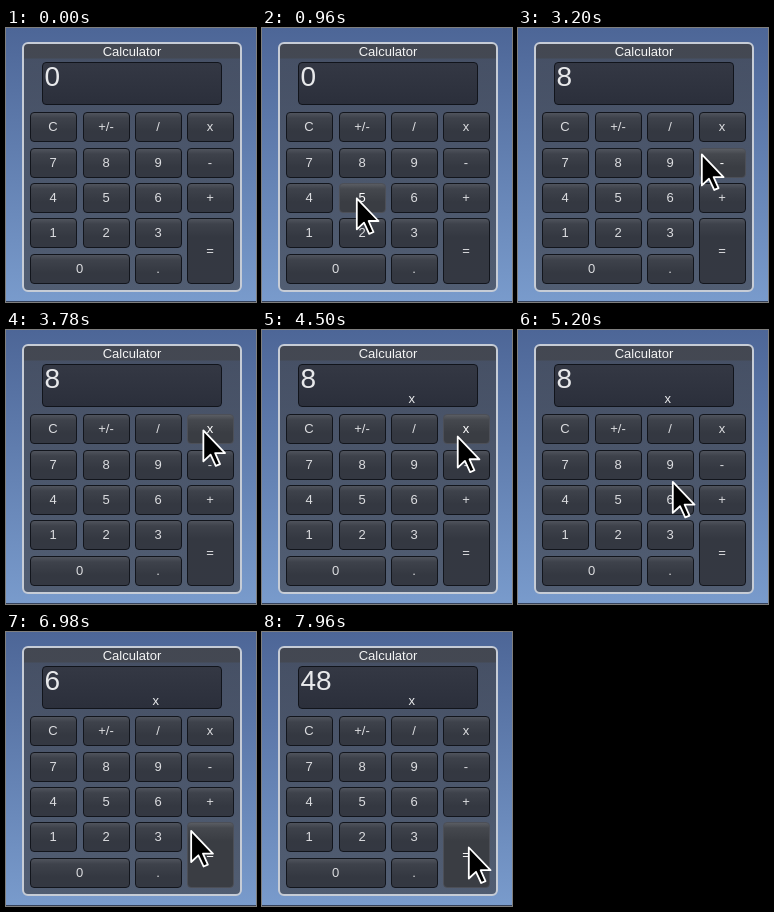
An HTML page for the animation above (8 s loop, 250 by 274 pixels).

```html
<!DOCTYPE html>
<html lang="en">
<head>
<meta charset="utf-8">
<title>Calculator</title>
<style>
  html, body { margin: 0; width: 100%; height: 100%; overflow: hidden; }
  body {
    position: relative;
    background: linear-gradient(#4d6697, #799bcc);
    font: 13px "Liberation Sans", Arial, sans-serif;
    color: #dcdde0;
  }
  body > *, .key { position: absolute; box-sizing: border-box; }
  .floor { left: 0; right: 0; top: 273px; height: 1px; background: #34415a; }
  .panel {
    left: 16px; top: 14px; width: 220px; height: 250px;
    border: 2px solid #c6ccd6; border-radius: 6px;
    background: linear-gradient(rgba(66, 68, 74, .9) 14px, rgba(66, 70, 80, .72) 15px);
  }
  .title { left: 16px; top: 16px; width: 220px; line-height: 15px; text-align: center; color: #f4f4f4; }
  .screen {
    left: 36px; top: 34px; width: 180px; height: 43px;
    border: 1px solid #11141b; border-radius: 4px;
    background: linear-gradient(#343844, #2b2f3b);
  }
  #value { left: 38.5px; top: 33px; font-size: 28px; line-height: 32px; color: #e8e9eb; }
  #op { left: 146.6px; top: 61px; line-height: 15px; color: #e8e9eb; }
  .key {
    display: flex; align-items: center; justify-content: center;
    padding: 0 1px 1px 0;
    border: 1px solid #12151c; border-radius: 4px;
    background: linear-gradient(#50545d, #3e424b 5px, #343841 18px, #343842);
  }
  .key.hover {
    border-color: #4c4f57; color: #fff;
    background: linear-gradient(#5a5d63, #45484e 5px, #3a3d43 18px, #3a3d43);
  }
  .key.down {
    border-color: #7b7e85; color: #fff;
    background: linear-gradient(#343841, #3a3d46);
  }
  svg { left: 0; top: 0; width: 250px; height: 274px; }
</style>
</head>
<body>
<div class="floor"></div>
<div class="panel"></div>
<div class="title">Calculator</div>
<div class="screen"></div>
<div id="value">0</div>
<div id="op"></div>
<div id="keys" style="left:0;top:0"></div>
<svg viewBox="0 0 250 274">
  <g id="ring" fill="none">
    <circle stroke="#fff" stroke-width="5"/>
    <circle stroke="#000" stroke-width="2.5"/>
  </g>
  <path id="cursor" d="M.8 1.5V32.5L8 25.8L13.2 37L17.5 35.2L12.6 24.2H22.5Z"
        fill="#000" stroke="#fff" stroke-width="1.8" stroke-linejoin="round"/>
</svg>
<script>
const LOOP = 8000, RING = 140, PRESS = 140, RADIUS = 43.2;
const $ = id => document.getElementById(id);
const cols = [24, 77, 129, 181], rows = [84, 120, 155, 190, 226];

const keys = [];
function addKey(label, col, row, w = 47, h = 30) {
  const el = document.createElement('div');
  const x = cols[col], y = rows[row];
  el.className = 'key';
  el.textContent = label;
  el.style.cssText = `left:${x}px;top:${y}px;width:${w}px;height:${h}px`;
  $('keys').append(el);
  keys.push({ el, x, y, w, h });
}
['C +/- / x', '7 8 9 -', '4 5 6 +', '1 2 3'].forEach((line, row) =>
  line.split(' ').forEach((label, col) => addKey(label, col, row)));
addKey('=', 3, 3, 47, 66);
addKey('0', 0, 4, 100);
addKey('.', 2, 4);

// time, x, y of the pointer tip
const path = [
  [0, 122, 278], [20, 122, 276], [120, 121, 264], [260, 121, 264],
  [960, 94, 169], [1000, 94, 161], [1100, 94, 160], [1700, 96, 136],
  [2380, 96, 136], [3100, 182, 127], [3200, 183, 125], [3800, 197, 98],
  [4360, 197, 98], [4500, 195, 105], [5160, 154, 149], [5880, 154, 174],
  [6580, 154, 174], [7280, 207, 215], [7820, 207, 215], [7960, 206, 214],
  [LOOP, 206, 214]
];
const clicks = [1960, 3940, 6160, 7540];
const values = [[0, '0'], [2240, '8'], [6440, '6'], [7820, '48']];

function pointerAt(t) {
  const i = path.findIndex(p => p[0] > t);
  const [t0, x0, y0] = path[i - 1], [t1, x1, y1] = path[i];
  const u = (t - t0) / (t1 - t0);
  return [x0 + (x1 - x0) * u, y0 + (y1 - y0) * u];
}

function draw() {
  const t = performance.now() % LOOP;
  const [x, y] = pointerAt(t);
  const click = clicks.find(c => t >= c && t < c + RING + PRESS);
  const age = t - click;
  const ringOn = age < RING, down = age >= RING;

  $('cursor').setAttribute('transform', `translate(${x} ${y})`);
  $('ring').style.display = ringOn ? '' : 'none';
  if (ringOn) {
    const r = RADIUS * (1 - age / RING);
    $('ring').setAttribute('transform', `translate(${x + 1.3} ${y + 4.7})`);
    for (const c of $('ring').children) c.setAttribute('r', r);
  }
  for (const k of keys) {
    const over = x >= k.x && x < k.x + k.w && y >= k.y && y < k.y + k.h;
    k.el.className = 'key' + (over ? (down ? ' down' : ' hover') : '');
  }
  $('value').textContent = values.findLast(v => t >= v[0])[1];
  $('op').textContent = t >= 4220 ? 'x' : '';
  requestAnimationFrame(draw);
}
draw();
</script>
</body>
</html>
```
